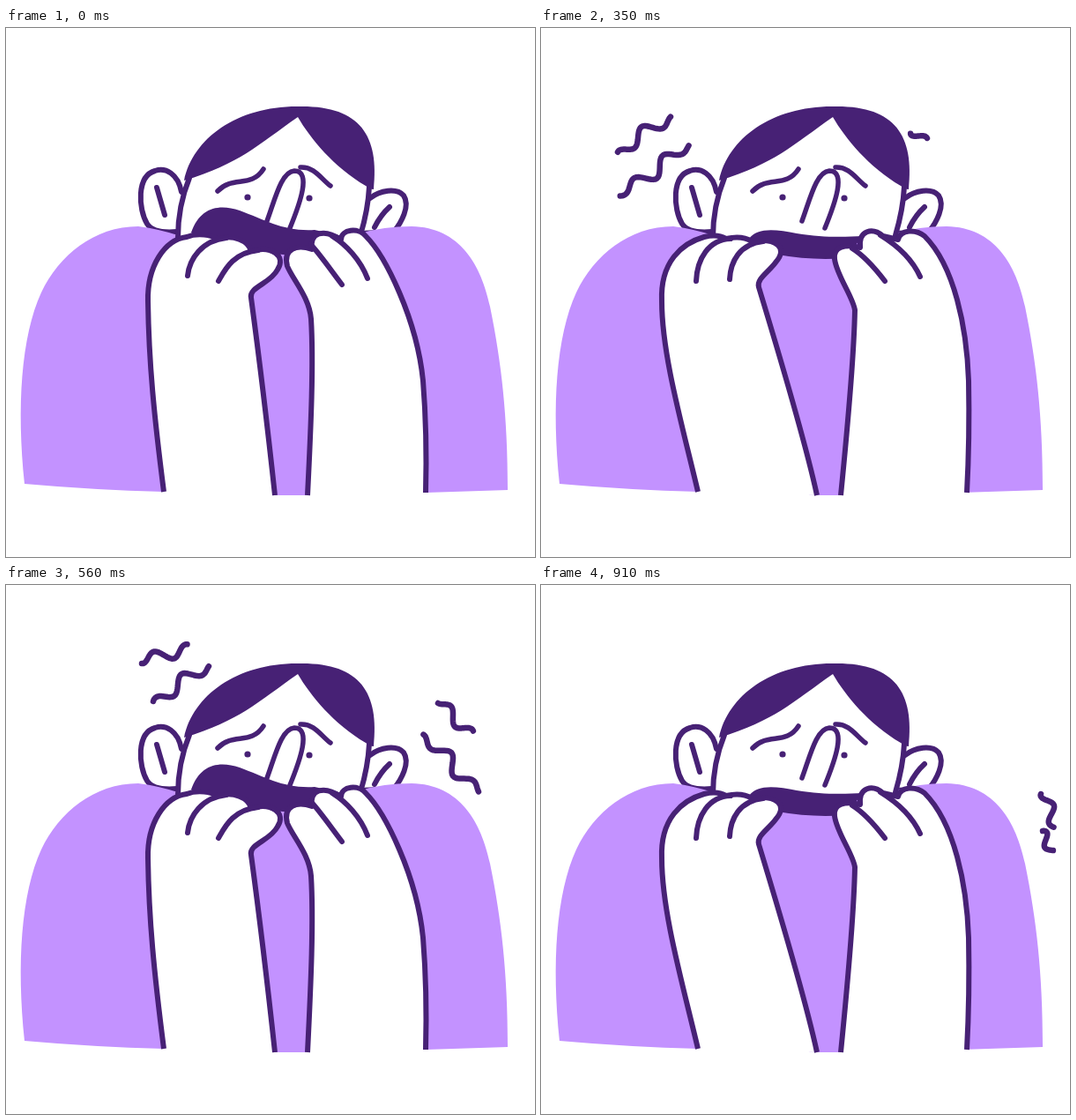
An HTML page with a canvas for the animation above (0.98 s loop, 600 by 600 pixels).

```html
<!DOCTYPE html>
<html lang="en">
<head>
<meta charset="utf-8">
<title>Worried</title>
<style>
  html, body { margin: 0; height: 100%; overflow: hidden; background: #fff; }
  canvas { display: block; width: 600px; height: 600px; }
</style>
</head>
<body>
<canvas width="600" height="600"></canvas>
<script>
const ctx = document.querySelector('canvas').getContext('2d');
const DARK = '#472175', LILAC = '#c392ff', WHITE = '#fff';
const STEP = 70, STEPS = 14;

function paint(d, fill, stroke, width = 6, cap = 'round') {
  const path = new Path2D(d);
  if (fill) { ctx.fillStyle = fill; ctx.fill(path); }
  if (!stroke) return;
  ctx.strokeStyle = stroke;
  ctx.lineWidth = width;
  ctx.lineCap = cap;
  ctx.lineJoin = 'round';
  ctx.stroke(path);
}

function dot(x, y) {
  ctx.fillStyle = DARK;
  ctx.beginPath();
  ctx.arc(x, y, 3.6, 0, 7);
  ctx.fill();
}

function drawFigure() {
  // Ears
  paint('M199 186C195 165 181 158 169 162C148 168 150 205 160 222C166 232 182 232 194 231', WHITE, DARK);
  paint('M171 181L180 212', null, DARK);
  paint('M413 193C424 184 443 181 451 190C459 202 448 221 440 231L402 233', WHITE, DARK);
  paint('M435 203Q425 212 418 226', null, DARK);
  // Body
  paint('M21 517C12 430 17 350 40 300C60 258 100 225 150 225Q174 228 198 236L402 233Q428 225 460 225' +
        'C515 226 539 269 549 316C562 380 569 440 569 524L476 527L400 480L342 530H305L240 480L179 526Q100 524 21 517Z', LILAC);
  // Head
  paint('M208 170C199 192 195 213 195 238L240 243H380L402 235C408 215 411 200 412 180L331 98Z', WHITE);
  paint('M208 170C199 192 195 213 195 238M412 180C411 200 408 215 402 235', null, DARK);
  paint('M202 173C212 125 262 89 330 89C400 87 424 120 417 183Q413 183 408 179C372 158 345 125 331 101C285 133 265 154 202 173Z', DARK);
  // Face
  paint('M240 185C257 167 278 182 292 160M334 158C350 157 358 172 368 179', null, DARK, 5.5);
  paint('M296 219C305 195 312 163 327 162C347 162 333 200 322 227', null, DARK, 5.5);
  dot(274, 192);
  dot(344, 193);
}

const poses = [
  {
    mouth: 'M210 232C220 203 242 199 265 207C295 218 315 231 350 229L382 236L345 256L314 257L278 253L235 240Z',
    left: 'M179 526C168 440 162 380 161 310C160 270 180 240 205 237C218 232 233 235 240 239C258 234 275 241 278 253' +
          'C302 246 318 259 308 274C300 290 275 294 278 306Q292 410 305 530',
    right: 'M342 530C346 450 349 380 346 330C344 305 325 285 319 270C314 250 330 245 347 251C344 232 360 227 380 240' +
           'C380 228 400 226 408 236C430 258 466 330 473 400C477 450 477 490 476 527',
    fingers: 'M206 281C208 262 222 241 250 238M241 287C248 275 257 255 286 252' +
             'M347 247C357 258 368 274 381 291M370 236C386 246 402 263 410 284'
  },
  {
    mouth: 'M236 239C245 226 266 228 290 233C320 238 345 237 365 236L345 261Q308 264 268 257Z',
    left: 'M178 526C160 450 137 370 137 310C135 265 160 244 185 237Q200 233 210 239Q228 235 239 242' +
          'C267 238 281 249 266 266C258 277 244 285 247 294C261 340 300 470 313 530',
    right: 'M340 530C348 450 355 370 356 320C354 305 335 280 333 262C331 248 345 245 362 249C360 229 376 226 388 236' +
           'L405 240C408 228 425 228 435 236C469 270 483 340 485 400C486 450 485 490 483 527',
    fingers: 'M176 287C177 262 190 240 215 239M214 285C215 265 225 245 252 242' +
             'M353 250C366 258 377 270 390 287M385 235C403 246 420 260 430 282'
  }
];

// Wavy strokes: tail and head each glide along a quadratic curve while the wave runs through.
const AMPLITUDE = 9, WAVELENGTH = 44, DRIFT = 0.35;
const wiggles = [
  { from: 2, to: 8, gone: 11, phase: 0.7, tail: [[62, 234], [66, 120], [154, 89]], head: [[102, 178], [142, 77], [207, 68]] },
  { from: 4, to: 8, gone: 11, phase: 0.1, tail: [[69, 202], [108, 183], [167, 132]], head: [[133, 152], [212, 108], [231, 91]] },
  { from: 6, to: 13, gone: 14, phase: 1.15, tail: [[437, 135], [500, 191], [569, 279]], head: [[482, 179], [597, 294], [582, 301]] },
  { from: 8, to: 13, gone: 14, phase: 1, tail: [[490, 134], [542, 159], [567, 237]], head: [[530, 167], [609, 273], [583, 275]] }
];

const glide = ([a, b, c], u) =>
  a.map((v, k) => (1 - u) ** 2 * v + 2 * u * (1 - u) * b[k] + u * u * c[k]);

function drawWiggle(w, step) {
  if (step < w.from - 1 || step >= w.gone) return;
  const u = (step - w.from) / (w.to - w.from);
  const [x, y] = glide(w.tail, u), [hx, hy] = glide(w.head, u);
  const dx = hx - x, dy = hy - y, length = Math.hypot(dx, dy);
  const phase = Math.PI * (w.phase + DRIFT * (step - w.from));
  // Only half shows while it appears or leaves
  const start = u > 1 ? 0.5 : 0, end = u < 0 ? 0.5 : 1;
  const points = [];
  for (let s = start; s <= end; s += 0.02) {
    const taper = Math.sin(Math.PI * Math.min(s, 1)) ** 0.7;
    const wave = AMPLITUDE * taper * Math.sin(phase + 2 * Math.PI * s * length / WAVELENGTH) / length;
    points.push([x + dx * s - dy * wave, y + dy * s + dx * wave]);
  }
  paint('M' + points.join('L'), null, DARK, 6.5);
}

function frame(now) {
  const step = Math.floor(now / STEP) % STEPS;
  const pose = poses[step % 2];
  ctx.clearRect(0, 0, 600, 600);
  drawFigure();
  paint(pose.mouth, DARK);
  paint(pose.left, WHITE, DARK, 6, 'butt');
  paint(pose.right, WHITE, DARK, 6, 'butt');
  paint(pose.fingers, null, DARK);
  wiggles.forEach(w => drawWiggle(w, step));
  requestAnimationFrame(frame);
}
frame(performance.now());
</script>
</body>
</html>
```
